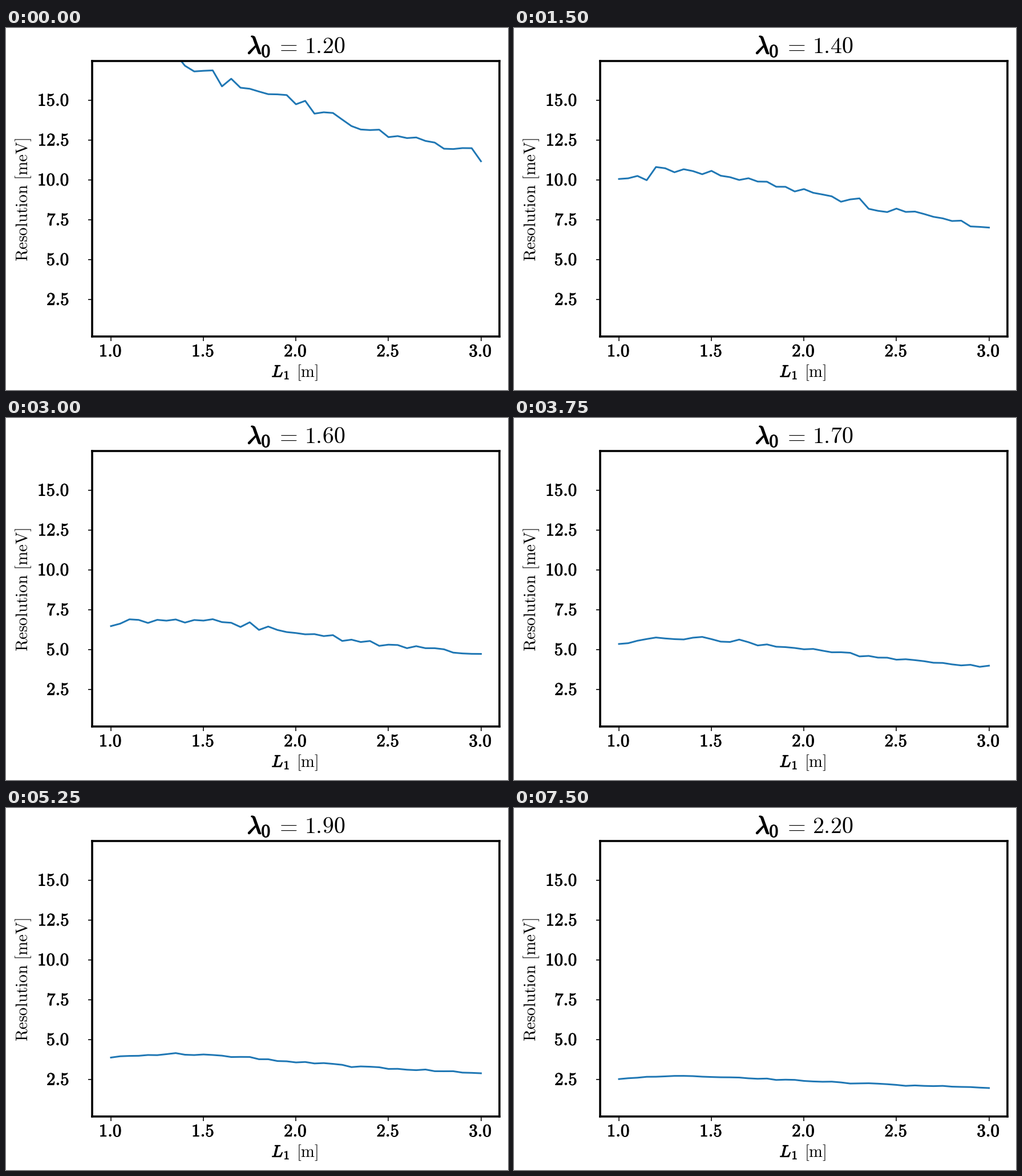
A matplotlib script that plays this animation: 880x636 px, repeating every 8 s.

```python
import numpy as np
import matplotlib.pyplot as plt
from matplotlib.animation import FuncAnimation
from matplotlib.patheffects import withStroke

W, H, DPI = 880, 636, 100
PT = 72 / DPI  # points per pixel
plt.rcParams["mathtext.fontset"] = "cm"

x = np.linspace(1, 3, 41)
lambdas = np.linspace(1.2, 2.2, 11)

# Relative height of the curve at five lengths, for three wavelengths
key_x = np.linspace(1, 3, 5)
key_lam = [1.2, 1.4, 2.2]
key_shape = np.array([[1.0, 0.975, 0.845, 0.74, 0.655],
                      [0.955, 0.99, 0.885, 0.77, 0.665],
                      [0.95, 0.995, 0.905, 0.805, 0.735]])


def curve(k):
    """Resolution in meV: a power law in wavelength, a smooth fall, seeded noise."""
    lam = lambdas[k]
    scale = 17.5 * (1.2 / lam) ** (3.34 - 0.28 * (lam - 1.3))
    keys = [np.interp(lam, key_lam, column) for column in key_shape.T]
    smooth = np.polyval(np.polyfit(key_x - 2, keys, 4), x - 2)
    noise = np.random.default_rng(k).normal(0, 0.02 * 1.2 / lam, x.size)
    return scale * smooth * (1 + noise)


curves = [curve(k) for k in range(len(lambdas))]

fig = plt.figure(figsize=(W / DPI, H / DPI), dpi=DPI, facecolor="white")


def label(px, py, text, size, bold=0, **kw):
    """Text with its baseline at pixel (px, py), measured from the top left."""
    t = fig.text(px / W, 1 - py / H, text, fontsize=size * PT,
                 va="baseline", color="black", **kw)
    if bold:
        t.set_path_effects([withStroke(linewidth=bold * PT, foreground="black")])
    return t


def to_px(v):
    return 184 + (v - 1) * 324.3


def to_py(v):
    return 127 + (15 - v) * 28


left, right, top, bottom = 151.2, 865, 57.9, 542
ax = fig.add_axes([left / W, 1 - bottom / H, (right - left) / W, (bottom - top) / H])
ax.set_xlim(1 + (left - 184) / 324.3, 1 + (right - 184) / 324.3)
ax.set_ylim(15 - (bottom - 127) / 28, 15 - (top - 127) / 28)
xticks = np.arange(1, 3.1, 0.5)
yticks = np.arange(2.5, 15.1, 2.5)
ax.set_xticks(xticks, [""] * len(xticks))
ax.set_yticks(yticks, [""] * len(yticks))
ax.tick_params(length=7.5 * PT, width=1.6 * PT)
for spine in ax.spines.values():
    spine.set_linewidth(3.6 * PT)

for v in xticks:
    label(to_px(v) - 1, 577, rf"$\mathbf{{{v:.1f}}}$", 31, 0.9, ha="center")
for v in yticks:
    label(111, to_py(v) + 9.5, rf"$\mathbf{{{v:.1f}}}$", 31, 0.9, ha="right")

label(38, 410, r"$\mathrm{Resolution\ [meV]}$", 29.1,
      rotation=90, rotation_mode="anchor", ha="left")
label(465.5, 613, r"$L$", 29.3, 1.2)
label(486.5, 617, r"$\mathbf{1}$", 21, 0.9)
label(508.5, 613, r"$\mathrm{[m]}$", 28.7)

label(422.5, 45, r"$\lambda$", 44, 1.9)
label(447.5, 50.8, r"$\mathbf{0}$", 31.5, 1.2)
label(472, 45, r"$=$", 41)
number = label(522.5, 44.5, "$1.20$", 40)

line, = ax.plot(x, curves[0], color="#1f77b4", lw=3 * PT, solid_capstyle="projecting")


def draw(i):
    k = i // 3
    line.set_ydata(curves[k])
    number.set_text(f"${lambdas[k]:.2f}$")
    return line, number


anim = FuncAnimation(fig, draw, frames=32, interval=250, repeat=True, repeat_delay=0)
plt.show()
```
